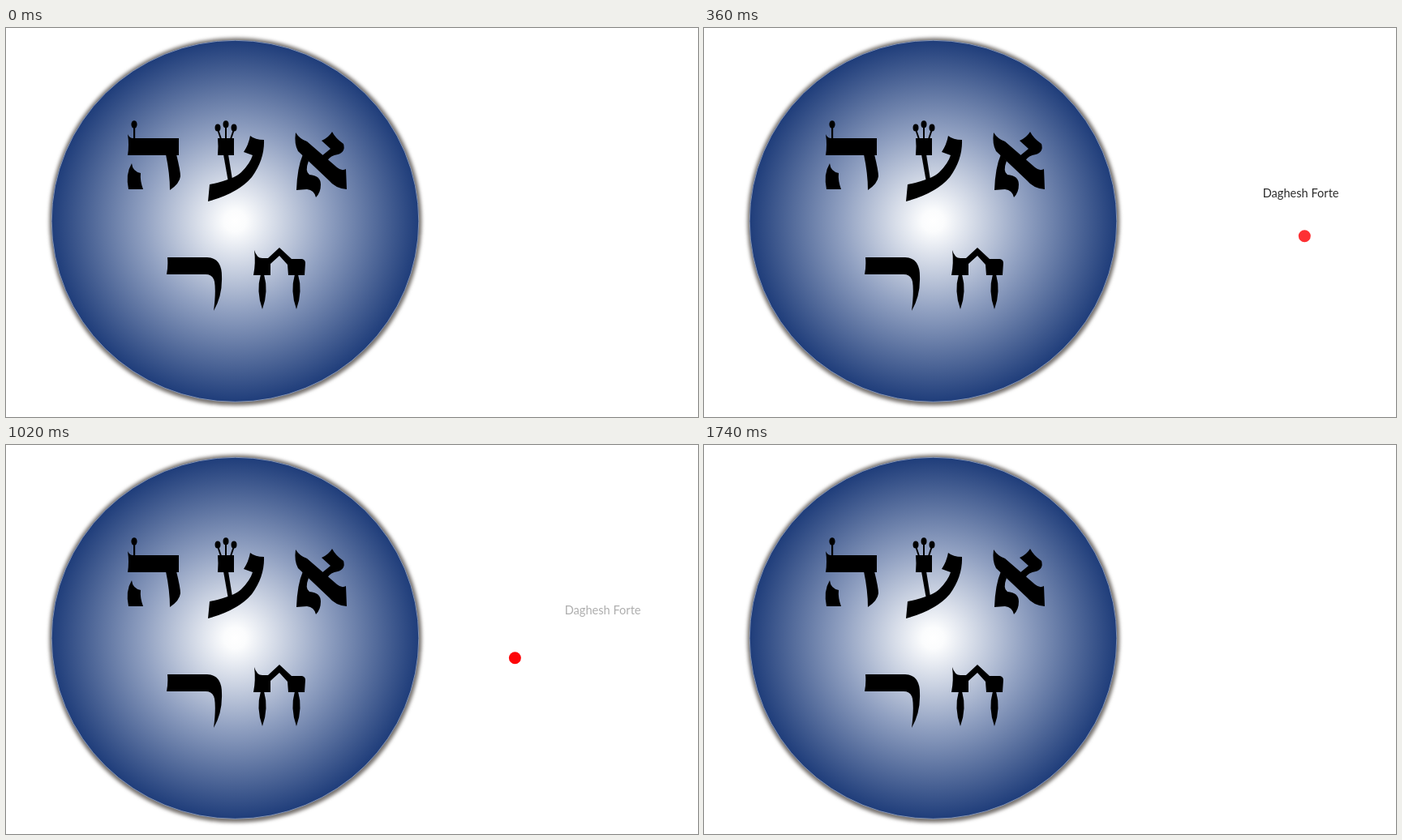
Recreate the animation shown at these times as an HTML page. Size 853 px wide and 480 px high, loop 2.41 s.

```html
<!DOCTYPE html>
<html lang="en">
<head>
<meta charset="utf-8">
<title>Daghesh Forte</title>
<style>
  html, body { margin: 0; width: 100%; height: 100%; overflow: hidden; background: #fff; }
  svg { display: block; width: 100vw; height: 100vh; }
  text { font: 14.6px Lato, "Open Sans", sans-serif; text-anchor: middle; }
</style>
</head>
<body>
<svg viewBox="0 0 853 480">
  <defs>
    <radialGradient id="ball">
      <stop offset="0" stop-color="#fff"/>
      <stop offset=".06" stop-color="#fbfcfd"/>
      <stop offset=".5" stop-color="#90a0c1"/>
      <stop offset="1" stop-color="#1f3d7a"/>
    </radialGradient>
    <filter id="soft" x="-5%" y="-5%" width="110%" height="110%">
      <feGaussianBlur stdDeviation="2"/>
    </filter>
  </defs>

  <ellipse cx="282.9" cy="239" rx="229.5" ry="226.8" fill="#787370" filter="url(#soft)"/>
  <ellipse cx="282.5" cy="238.3" rx="226.3" ry="223" fill="url(#ball)" stroke="#8494b5"/>

  <g id="he">
    <ellipse cx="158" cy="119" rx="3.6" ry="4.8"/>
    <path d="M157 122H159.2V137H157Z"/>
    <path d="M150 131Q152 136 157 136H213V157H150Q152 144 150 131Z"/>
    <path d="M197 156H210Q215 176 215 183Q214 192 202 200Q202 180 197 156Z"/>
    <path d="M155 167Q156 177 166 179Q165 188 169 199H151Q147 180 155 167Z"/>
  </g>

  <g id="ayin">
    <ellipse cx="261" cy="123" rx="3.5" ry="4.6"/>
    <ellipse cx="271" cy="118.8" rx="3.5" ry="4.6"/>
    <ellipse cx="281" cy="123" rx="3.5" ry="4.6"/>
    <path d="M261 125L265 137M271 121V137M281 125L277 137" stroke="#000" stroke-width="2"/>
    <path d="M261 136H281V157H261Q262 146 261 136Z"/>
    <path d="M268 156H274L279 187L274 190Z"/>
    <path d="M301 133Q307 138 318 138Q319 162 303 184Q286 204 249 214L251 193Q281 187 290 178Q301 167 304 157L293 153Q299 144 301 133Z"/>
  </g>

  <g id="alef">
    <path d="M357 129Q362 137 371 140L408 172Q414 177 419 174L420 199Q406 198 398 188L360 152Q355 143 357 129Z"/>
    <path d="M402 128Q406 136 416 143Q419 153 409 156Q400 157 396 164L389 158L400 149L389 139Q398 135 402 128Z"/>
    <path d="M366 156L373 164Q368 177 374 181Q388 182 388 193Q388 203 382 209Q380 200 371 199L358 200Q359 172 366 156Z"/>
  </g>

  <g id="resh">
    <path d="M199 283H248Q266 284 266 306Q267 330 256 349Q259 325 257 313Q255 304 246 304H198Q200 294 199 283Z"/>
  </g>

  <g id="het">
    <path d="M306 274Q309 284 316 284H323L337 271L352 285H365Q369 286 369 290L368 305H348L347 292L337 281L326 291V305H305Q308 290 306 274Z"/>
    <path d="M314 304Q308 325 316 347Q324 325 318 304Z"/>
    <path d="M356 304Q350 325 358 347Q366 325 360 304Z"/>
  </g>

  <text id="label" x="735.6" y="209" opacity="0">Daghesh Forte</text>
  <circle id="dot" r="7.5" fill="#fd0509" opacity="0"/>
</svg>
<script>
  const LOOP = 2410, STEP = 60, LAST = 1740;
  const START = { x: 740.3, y: 256.7 }, HIT = { x: 512, y: 282, t: 1225 };
  const label = document.getElementById("label");
  const dot = document.getElementById("dot");
  const clamp = v => Math.min(1, Math.max(0, v));

  // Speeds up towards the ball, then rebounds down to the right, slowing.
  function place(t) {
    if (t < HIT.t) {
      const n = Math.max(0, (t - 600) / STEP);
      const d = 4.3 * n + 1.69 * n * n;
      return [START.x - d, START.y + 21.5 * (d / 212) ** 2];
    }
    const n = (t - HIT.t) / STEP;
    const d = 52.6 * n - 1.38 * n * n;
    return [HIT.x + d, HIT.y + 0.6 * d];
  }

  function draw(now) {
    const t = Math.min(LAST, Math.floor((now % LOOP) / STEP) * STEP);
    const fadeIn = clamp(t / 435);
    const [x, y] = place(t);
    dot.setAttribute("cx", x);
    dot.setAttribute("cy", y);
    dot.setAttribute("opacity", t < LAST ? fadeIn : 0);
    label.setAttribute("opacity", fadeIn * clamp((1160 - t) / 440));
  }

  const begin = performance.now();
  function tick() {
    draw(performance.now() - begin);
    requestAnimationFrame(tick);
  }
  tick();
</script>
</body>
</html>
```
